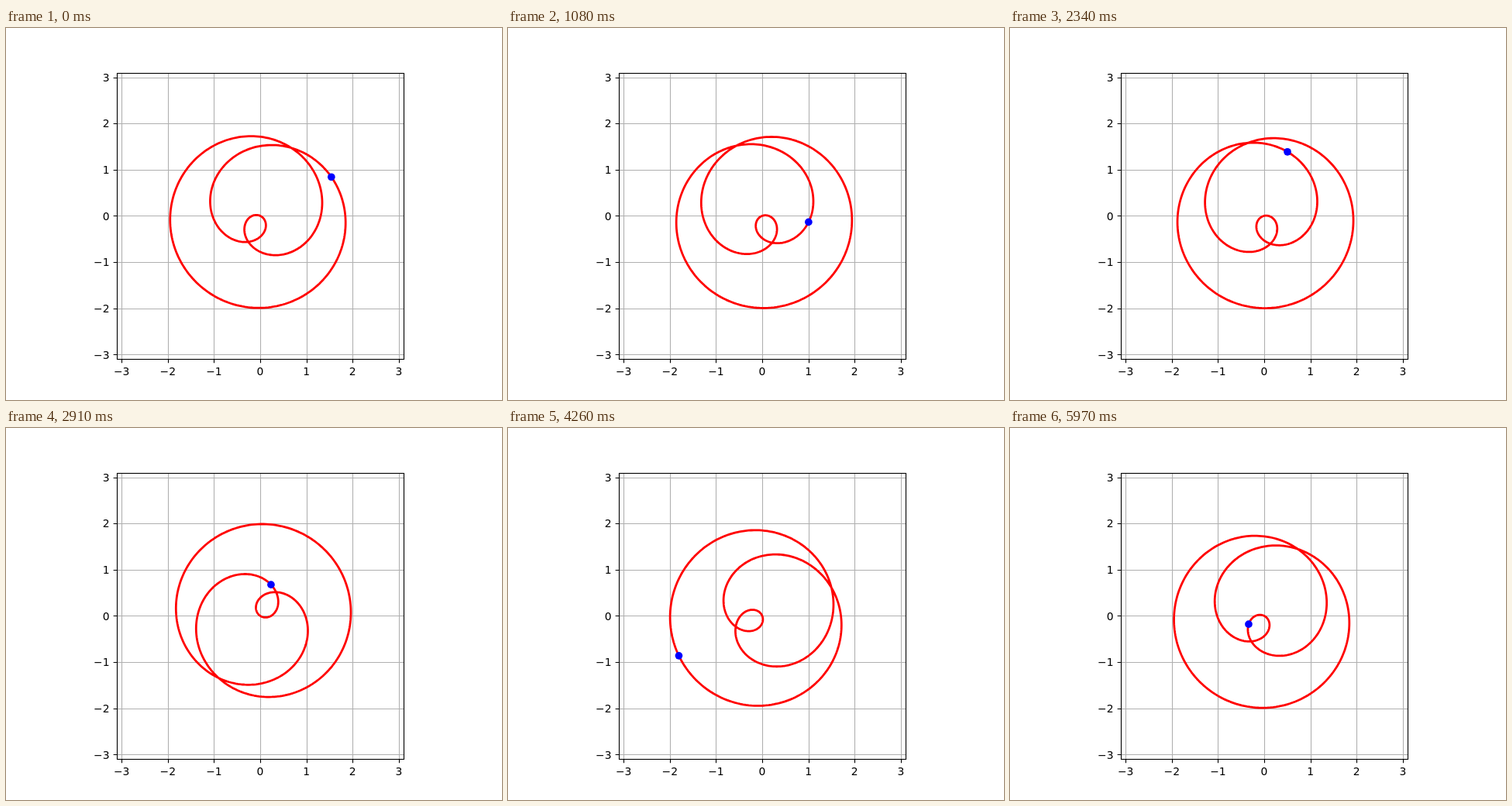
Recreate the animation shown at these times as an HTML page. Size 640 by 480 pixels, loop 6000 ms.

```html
<!DOCTYPE html>
<html lang="en">
<head>
<meta charset="utf-8">
<title>Rotating rose curve</title>
<style>
  html, body { margin: 0; width: 100%; height: 100%; overflow: hidden; background: #fff; }
  svg { display: block; }
  text { font: 13.89px "DejaVu Sans", sans-serif; }
</style>
</head>
<body>
<svg width="640" height="480" viewBox="0 0 640 480">
  <path id="grid" fill="none" stroke="#b0b0b0" stroke-width="1.11"/>
  <path id="curve" fill="none" stroke="#f00" stroke-width="2.78" stroke-linejoin="round"/>
  <circle id="dot" r="4.86" fill="#00f"/>
  <path id="ticks" fill="none" stroke="#000" stroke-width="1.11"/>
  <rect x="143.5" y="58.5" width="370" height="369" fill="none" stroke="#000" stroke-width="1.11"/>
  <g id="labels"></g>
</svg>
<script>
const FRAME_MS = 30, FRAMES = 200, POINTS = 500;
const STEP = 4 * Math.PI / (POINTS - 1);
const UNIT = 369.6 / 6.2;
const $ = id => document.getElementById(id);
const px = x => 328 + UNIT * x;
const py = y => 242.4 - UNIT * y;
const snap = v => Math.round(v) + 0.5;

function addLabel(text, x, y, anchor) {
  const el = document.createElementNS("http://www.w3.org/2000/svg", "text");
  el.setAttribute("x", x);
  el.setAttribute("y", y);
  el.setAttribute("text-anchor", anchor);
  el.textContent = text;
  $("labels").append(el);
}

function drawAxes() {
  let grid = "", ticks = "";
  for (let k = -3; k <= 3; k++) {
    const x = snap(px(k)), y = snap(py(k));
    const text = String(k).replace("-", "\u2212");
    grid += `M${x} 58.5V427.5M143.5 ${y}H513.5`;
    ticks += `M${x} 427.5v4.86M143.5 ${y}h-4.86`;
    addLabel(text, px(k), 448, "middle");
    addLabel(text, 133.5, Math.round(py(k) + 5.3), "end");
  }
  $("grid").setAttribute("d", grid);
  $("ticks").setAttribute("d", ticks);
}

// Sum of two unit circles with a 2:3 frequency ratio
function point(u, phase) {
  const v = 1.5 * u + phase;
  return [px(Math.cos(u) + Math.cos(v)), py(Math.sin(u) + Math.sin(v))];
}

let shown = -1;
function draw() {
  const n = Math.floor(performance.now() / FRAME_MS) % FRAMES;
  if (n !== shown) {
    shown = n;
    const phase = 1 + 0.6 * n;
    const points = Array.from({ length: POINTS }, (_, i) =>
      point(i * STEP, phase).map(c => c.toFixed(2)));
    $("curve").setAttribute("d", "M" + points.join("L"));
    const [x, y] = point(n * STEP, phase);
    $("dot").setAttribute("cx", x);
    $("dot").setAttribute("cy", y);
  }
  requestAnimationFrame(draw);
}

drawAxes();
draw();
</script>
</body>
</html>
```
